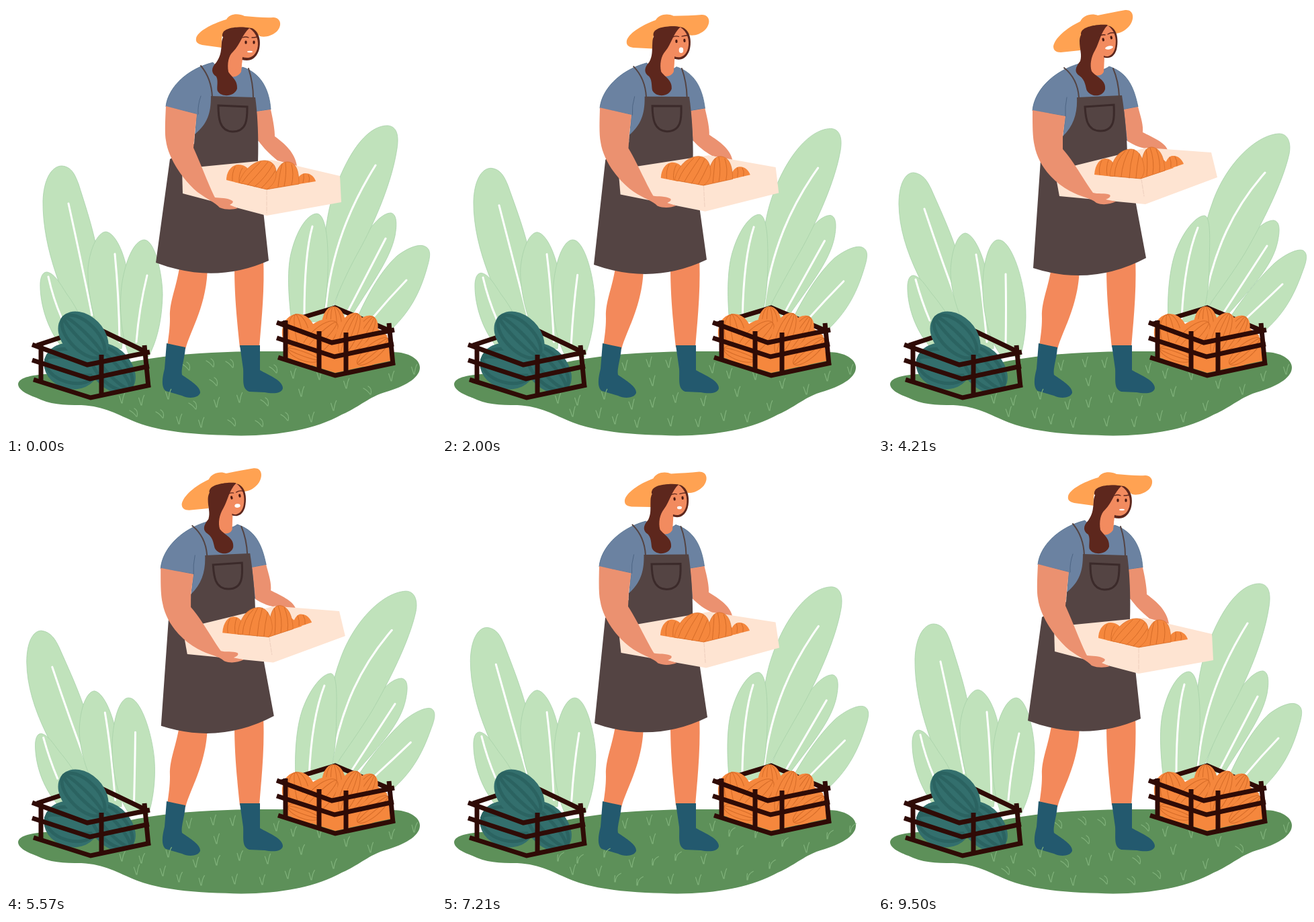
Animation of 640 by 640 pixels, one loop 9.57 s. Source, as an HTML page:

```html
<!DOCTYPE html>
<html lang="en">
<head>
<meta charset="utf-8">
<title>Harvest</title>
<style>
html, body { margin: 0; width: 100%; height: 100%; overflow: hidden; background: #fff; }
svg { display: block; width: 100vw; height: 100vh; }
</style>
</head>
<body>
<svg id="stage" viewBox="0 0 640 640"></svg>
<script>
const LOOP = 9570, REF = 4210;
const stage = document.getElementById('stage');
const movers = [];

function el(tag, attrs, parent = stage) {
  const n = document.createElementNS('http://www.w3.org/2000/svg', tag);
  for (const k in attrs) n.setAttribute(k, attrs[k]);
  parent.appendChild(n);
  return n;
}
const fill = c => ({ fill: c });
const line = (c, w, cap = 'round') =>
  ({ fill: 'none', stroke: c, 'stroke-width': w, 'stroke-linecap': cap });
const shape = (d, attrs, parent) => el('path', { d, ...attrs }, parent);

// cubic-bezier(.42, 0, .58, 1)
function ease(x) {
  if (x <= 0) return 0;
  if (x >= 1) return 1;
  let lo = 0, hi = 1, s;
  for (let i = 0; i < 24; i++) {
    s = (lo + hi) / 2;
    const v = 1.26 * s * (1 - s) ** 2 + 1.74 * s * s * (1 - s) + s ** 3;
    if (v < x) lo = s; else hi = s;
  }
  return s * s * (3 - 2 * s);
}

// There-and-back motion, scaled so that it equals 1 at REF
function sway(start, peak, end) {
  const raw = t => t < peak
    ? ease((t - start) / (peak - start))
    : 1 - ease((t - peak) / (end - peak));
  const unit = raw(REF);
  return t => raw(t) / unit;
}

// Interpolated keys: [[time, ...values], ...]
function keyed(keys, t) {
  let i = 1;
  while (i < keys.length - 1 && t > keys[i][0]) i++;
  const a = keys[i - 1], b = keys[i];
  const p = Math.min(1, (t - a[0]) / (b[0] - a[0]));
  return a.slice(1).map((v, j) => v + (b[j + 1] - v) * p);
}

const body = sway(0, 4785, LOOP);

function morph(from, to, attrs, pace = body) {
  const num = /-?\d+(?:\.\d+)?/g;
  const a = from.match(num).map(Number), b = to.match(num).map(Number);
  const glue = from.split(num);
  const node = shape(from, attrs);
  movers.push(t => {
    const p = pace(t);
    node.setAttribute('d', glue.map((g, i) =>
      i < a.length ? g + (a[i] + (b[i] - a[i]) * p).toFixed(2) : g).join(''));
  });
}

// ---- leaves ----
const LEAF = { fill: '#c0e2bb', stroke: '#a8d1a9', 'stroke-width': .8 };
function leaf(pace, a, b, veinA, veinB) {
  morph(a, b, LEAF, pace);
  morph(veinA, veinB, line('#fff', 3), pace);
}

leaf(sway(100, 4950, 9500),
  'M128 515C85 440 54 360 55 290C56 258 68 238 83 238C98 239 103 252 108 265C122 310 140 360 142 420L135 515Z',
  'M128 515C75 435 32 365 31 295C31 266 40 248 53 248C68 250 74 262 79 272C97 313 122 365 132 420L135 515Z',
  'M93 294Q112 380 128 460', 'M69 302Q95 380 125 460');
leaf(sway(100, 4600, 9100),
  'M150 510C128 470 121 420 122 390C125 360 137 336 149 336C164 338 180 375 182 410C184 450 176 480 172 510Z',
  'M150 510C120 470 108 425 108 395C109 365 118 339 130 338C145 340 160 380 164 410C169 450 172 480 172 510Z',
  'M162 369Q168 430 169 500', 'M146 370Q155 420 162 500');
leaf(sway(0, 4450, 8900),
  'M183 520C168 480 168 430 175 400C182 368 194 348 206 348C222 349 233 400 233 430C232 470 224 500 212 522Z',
  'M183 520C160 490 155 440 156 410C158 372 168 348 179 348C197 347 215 400 219 440C222 470 218 500 212 522Z',
  'M210 401Q198 450 194 500', 'M190 399Q191 450 190 505');
leaf(sway(300, 5100, 9500),
  'M85 510C60 480 50 440 51 412C52 400 56 396 61 396C72 398 80 412 90 428C108 452 120 480 125 510Z',
  'M80 510C52 480 43 440 44 415C45 405 48 401 53 401C63 403 70 415 80 428C100 452 118 480 125 510Z',
  'M63 403Q70 435 83 465', 'M56 407Q65 440 77 468');

leaf(sway(300, 5100, LOOP),
  'M520 470C540 425 560 392 582 372C598 360 615 353 624 358C634 363 631 375 626 392C615 430 600 455 575 480Z',
  'M520 470C545 430 572 400 590 383C605 370 625 360 633 364C641 369 637 382 632 395C618 435 602 460 575 484Z',
  'M596 408Q570 435 545 465', 'M602 414Q575 440 548 465');
leaf(sway(200, 4900, 9500),
  'M480 470C500 410 515 370 530 348C545 325 560 308 573 308C582 310 582 325 579 342C572 375 550 405 515 460Z',
  'M482 470C505 420 528 385 545 358C558 335 575 319 589 319C599 321 598 335 595 350C588 385 560 415 520 460Z',
  'M565 346L505 462', 'M579 357L512 460');
leaf(sway(100, 4650, 9200),
  'M470 460C470 400 472 330 485 287C505 225 535 178 568 178C582 179 585 193 582 212C575 260 550 320 525 365C500 410 490 440 480 460Z',
  'M474 460C478 400 480 340 497 295C515 240 560 192 597 190C611 190 615 205 612 220C603 262 571 325 546 368C520 410 495 440 484 460Z',
  'M550 237C512 298 484 365 476 450', 'M576 248C530 300 500 360 484 450');
leaf(sway(0, 4500, 9100),
  'M425 470C420 430 418 390 425 365C434 330 450 309 463 309C478 311 480 360 479 395C478 430 474 450 470 470Z',
  'M432 470C430 430 434 385 446 358C458 330 475 312 486 312C497 314 493 360 493 390C492 430 486 450 482 470Z',
  'M456 328Q444 370 444 462', 'M476 330Q456 380 452 465');

// ---- ground and grass ----
shape('M18 563C19 552 40 549 70 547C120 545 170 532 213 525C270 516 330 514 400 514L575 515' +
  'C600 515 616 526 616 538C616 552 598 564 570 573C540 581 528 596 500 608C460 630 410 639 350 639.500' +
  'C300 638 240 637 195 620C165 608 148 596 112 594C85 594 65 593 45 583C28 577 18 570 18 563Z', fill('#5d9059'));

const BENT = [[0, -1], [1000, -.7], [2000, 0], [7930, .1], [8700, -.6], [9500, -1], [LOOP, -1]];
const UPRIGHT = [[0, .1], [2000, .1], [2930, .5], [4210, .1], [5300, .1], [6500, .5], [7930, 1], [9500, .1], [LOOP, .1]];
function tufts(keys, spots) {
  for (let i = 0; i < spots.length; i += 2) {
    const x = spots[i], y = spots[i + 1];
    const node = shape('', line('#80b27b', 1.2));
    movers.push(t => {
      const [b] = keyed(keys, t), k = Math.abs(b);
      node.setAttribute('d',
        `M${x} ${y}Q${x - 2 + b * 2} ${y - 6} ${x - 4 + b * 6} ${y - 11 + k * 2}` +
        `M${x + 1} ${y}Q${x + 2 - b} ${y - 9} ${x + 4 + b * 7} ${y - 15 + k * 3}`);
    });
  }
}
tufts(BENT, [308, 537, 337, 538, 272, 542, 282, 600, 233, 613, 194, 611, 381, 626,
  419, 617, 389, 595, 402, 546, 542, 578, 313, 565, 340, 625]);
tufts(UPRIGHT, [172, 591, 201, 594, 257, 622, 290, 627, 347, 590, 454, 619, 487, 602,
  439, 581, 427, 554, 506, 569, 573, 558, 607, 548, 313, 597, 466, 556]);

// ---- crates ----
const DARK = '#2f0b06';
function gourd(cx, cy, rx, ry, turn, [skin, rib], width, ribs) {
  const g = el('g', { transform: `translate(${cx} ${cy}) rotate(${turn})` });
  el('ellipse', { rx, ry, ...fill(skin) }, g);
  for (const k of ribs) el('ellipse', { rx: rx - width / 2, ry: ry * k, ...line(rib, width) }, g);
}
function crate(dx, dy, rim, contents, posts) {
  const bars = { ...line(DARK, 7, 'butt'), transform: `translate(${dx} ${dy})` };
  shape(rim, bars);
  contents();
  shape('M403 471L485 501L578 482M403 494L489 522L577 503M405 523L490 550L579 531', bars);
  shape('M416 468V528M506 486V546M570 472L576 534' + posts, bars);
}

const MELON = ['#336f6d', '#2b6361'];
crate(-364, 33, 'M410 472L486 447L504 449L575 483', () => {
  gourd(97, 536, 41, 34, 15, MELON, 5, [.3, .72]);
  gourd(157, 539, 43, 29, 48, MELON, 5, [.3, .72]);
  gourd(115, 492, 43, 31, 45, MELON, 5, [.2, .65]);
}, '');

const ORANGE = '#f5873d', RIB = '#d66c28', PUMPKIN = [ORANGE, RIB];
crate(0, 0, 'M410 473L490 449L573 484', () => {
  shape('M418 482L455 474L490 465L540 470L556 482L567 490L573 528L490 546L418 523Z', fill(ORANGE));
  gourd(436, 488, 30, 25, 80, PUMPKIN, 1, [.2, .6]);
  gourd(532, 487, 29, 18, -58, PUMPKIN, 1, [.2, .6]);
  gourd(488, 476, 29, 18, 88, PUMPKIN, 1, [.25, .65]);
  gourd(466, 497, 37, 24, -45, PUMPKIN, 1, [.25, .65]);
  gourd(511, 488, 33, 19, -68, PUMPKIN, 1, [.2, .6]);
  gourd(443, 518, 25, 16, 20, PUMPKIN, 1, [.2, .6]);
  gourd(546, 514, 30, 17, -40, PUMPKIN, 1, [.2, .6]);
}, 'M466 484V543');

// ---- legs and boots ----
const LEG = fill('#f3895b'), BOOT = fill('#23596e');
shape('M258 390C252 425 243 440 244 465C244 480 242 492 240 507L267 511C274 483 300 445 300 385Z', LEG);
shape('M340 385C340 430 343 460 348 508L377 508C381 460 385 420 383 375Z', LEG);
shape('M239 502L267 508C266 525 260 540 262 549C275 558 290 567 289 576C285 585 270 584 262 580L238 573C231 568 232 555 236 540Z', BOOT);
shape('M348 505L378 505L378 542C390 549 412 557 412 569C410 578 395 577 385 575L362 574C350 570 354 555 353 540Z', BOOT);
tufts(UPRIGHT, [241, 585]);

// ---- torso ----
const SKIN = fill('#f28b5f'), ARM = fill('#eb9170'), APRON = '#544443';
morph('M308 84C265 95 240 125 238 150L284 161L281 200L376 200L373 157L394 154C392 125 380 100 352 91C340 100 320 100 308 84Z',
  'M299 86C258 98 232 128 230 156L279 164L275 200L371 200L366 154L387 150C380 115 368 98 344 90C332 99 312 99 299 86Z',
  { fill: '#6b82a1', stroke: '#4d6b8b', 'stroke-width': .8 });
morph('M290 134Q285 148 286 161', 'M281 136Q278 150 279 164', line('#4d6584', 1));
morph('M373 157L394 154C398 172 400 185 400 194C415 205 430 218 433 238L404 230C392 220 384 212 375 200Z',
  'M366 154L387 150C392 168 395 178 394 188C408 195 427 203 431 214L400 212C388 211 378 205 371 201Z', ARM);
morph('M322 74L352 76L350 98C345 106 336 108 325 102Z', 'M309 74L337 76L336 98C333 105 325 105 312 99Z', SKIN);
morph('M305 134L371 136C375 165 376 200 375 232L391 379Q310 415 223 382L244 228L280 205L281 191C300 175 305 160 305 134Z',
  'M296 136L363 133C368 165 371 200 371 225L399 375Q318 418 231 390L242 230L275 200L275 194C292 178 297 158 296 136Z', fill(APRON));
morph('M290 89Q306 108 307 136', 'M277 92Q297 108 299 136', line(APRON, 2));
morph('M361 93Q368 115 368 137', 'M350 93Q358 112 359 135', line(APRON, 2));
morph('M316 148L359 150C359 165 360 187 337 187C317 186 316 165 316 148Z',
  'M308 150L351 147C352 165 353 186 331 186C310 186 309 165 308 150Z', line('#3b2a2a', 3));

// ---- carried box ----
morph('M262 242L395 229L497 253L499 292L388 312L263 279Z',
  'M263 245L400 211L496 218L505 255L398 295L270 283Z', fill('#fee4d2'));
morph('M388 275L388 308', 'M392 258L396 283', { ...line('#f0d2c1', 1.2), 'stroke-dasharray': '6 2' });
morph('M340 262L388 273L445 263L420 245L360 250Z', 'M335 252L391 257L440 241L420 225L350 235Z', fill(ORANGE));
const PULP = { fill: ORANGE, stroke: RIB, 'stroke-width': .7 };
morph('M328 259C328 245 337 236 346 236C353 236 360 240 363 246L352 265Z',
  'M322 251C323 235 331 227 338 227C344 227 349 230 351 236L350 254Z', fill(ORANGE));
morph('M430 266C433 255 439 249 446 249C453 249 459 254 461 261Z',
  'M426 245C427 230 433 222 440 223C447 223 452 228 455 235Z', fill(ORANGE));
morph('M388 273C400 265 402 232 418 232C432 232 436 245 436 265Z',
  'M391 257C392 235 392 211 407 210C420 211 426 225 427 245Z', PULP);
morph('M347 263C352 245 370 229 386 230C398 231 403 240 402 250C402 260 396 268 388 273Z',
  'M345 253C347 230 358 213 377 213C388 214 394 225 396 240C397 248 394 254 391 257Z', PULP);
const ribs = [
  ['M341 239Q336 249 337 260', 'M333 230Q328 240 330 251'],
  ['M352 241Q346 250 347 262', 'M343 229Q339 240 341 252'],
  ['M352 262Q362 248 379 232', 'M352 253Q353 230 368 216'],
  ['M360 266Q374 252 390 232', 'M362 254Q364 232 374 214'],
  ['M370 269Q386 256 397 236', 'M374 256Q375 235 381 214'],
  ['M380 271Q392 260 401 245', 'M384 256Q385 238 389 220'],
  ['M405 269Q407 250 411 235', 'M400 253Q402 228 399 214'],
  ['M414 268Q418 250 416 233', 'M409 250Q412 230 405 211'],
  ['M425 266Q429 250 425 236', 'M419 247Q421 230 414 213'],
  ['M442 263Q444 256 443 250', 'M436 240Q437 232 434 225'],
  ['M451 262Q453 256 450 251', 'M445 238Q446 231 442 224']
];
for (const [a, b] of ribs) morph(a, b, line(RIB, 1));

morph('M238 149C237 170 236 190 238 200C241 225 262 258 285 277C300 288 312 293 318 300C328 304 338 303 345 301L333 296C337 294 339 292 337 290C330 285 318 286 311 285C302 268 290 235 279 211L281 190L284 161Z',
  'M230 155C230 180 230 195 233 208C238 235 258 260 285 275C303 285 316 285 325 293C335 297 345 295 354 291L339 288C344 286 347 284 345 281C338 278 326 280 320 278C308 262 292 232 275 213L275 194L279 164Z', ARM);

// ---- head ----
const HAIR = fill('#5d271d');
morph('M283 48C285 38 305 27 328 20C332 12 345 10 355 15C370 16 385 18 398 17C410 18 411 30 403 38C395 45 385 47 378 45C365 32 345 30 325 38C320 45 321 52 321 62L292 58C285 56 282 54 283 48Z',
  'M261 60C263 48 280 33 301 23C305 14 318 10 327 14C342 11 355 8 368 6C380 5 382 17 376 27C370 36 362 40 354 41C342 28 325 28 306 36C302 45 302 55 301 66L272 69C265 69 261 66 261 60Z', fill('#ffa252'));
morph('M322 45C320 30 350 30 366 33C378 38 380 55 376 67C371 80 362 83 351 80Z',
  'M302 42C301 30 328 26 345 30C357 35 358 52 355 65C351 77 343 79 335 76Z', HAIR);
morph('M362 33C373 40 377 52 374 64C370 76 362 79 352 76L350 96L326 92C324 85 328 70 334 62C344 50 348 42 362 33Z',
  'M342 29C352 36 356 48 353 62C350 74 342 77 336 74L336 98L312 98C310 85 314 72 320 62C324 50 328 38 342 29Z', SKIN);
morph('M362 33C340 28 322 38 321 55C320 70 319 75 313 84C305 92 305 100 313 105C317 112 312 125 316 128C322 136 340 135 344 123C345 110 335 105 331 98C329 86 331 74 338 68C349 57 351 43 362 33Z',
  'M342 28C318 26 301 34 300 52C300 65 304 72 301 82C293 92 292 99 300 104C309 110 309 122 311 126C318 137 335 135 338 124C340 110 325 106 318 97C315 88 317 76 323 66C330 53 331 40 342 28Z', HAIR);
morph('M352 47Q357 45 361 47M366 47Q370 47 374 46', 'M329 45Q334 42 338 43M342 42Q347 39 351 40', line('#5d271d', 1.3));
morph('M357 53L357 55M369 53L369 55', 'M335 49L335.500 51M347 46L347.500 48', line('#4a1a12', 3.1));

const MOUTH = [[0, 4, 1.3, 0], [2000, 3.3, 4.2, 0], [2930, 4.2, 3.3, -12], [4210, 6, 2.5, -12],
  [6500, 3, 3, 0], [7930, 4, 1.7, 0], [9500, 4, 1.3, 0], [LOOP, 4, 1.3, 0]];
const mouth = el('ellipse', fill('#fff'));
movers.push(t => {
  const [rx, ry, turn] = keyed(MOUTH, t), p = body(t);
  mouth.setAttribute('rx', rx);
  mouth.setAttribute('ry', ry);
  mouth.setAttribute('transform', `translate(${363 - 19 * p} ${68 - 6 * p}) rotate(${turn})`);
});

// ---- clock ----
const begin = performance.now();
function frame() {
  const t = (performance.now() - begin) % LOOP;
  for (const move of movers) move(t);
  requestAnimationFrame(frame);
}
frame();
</script>
</body>
</html>
```
